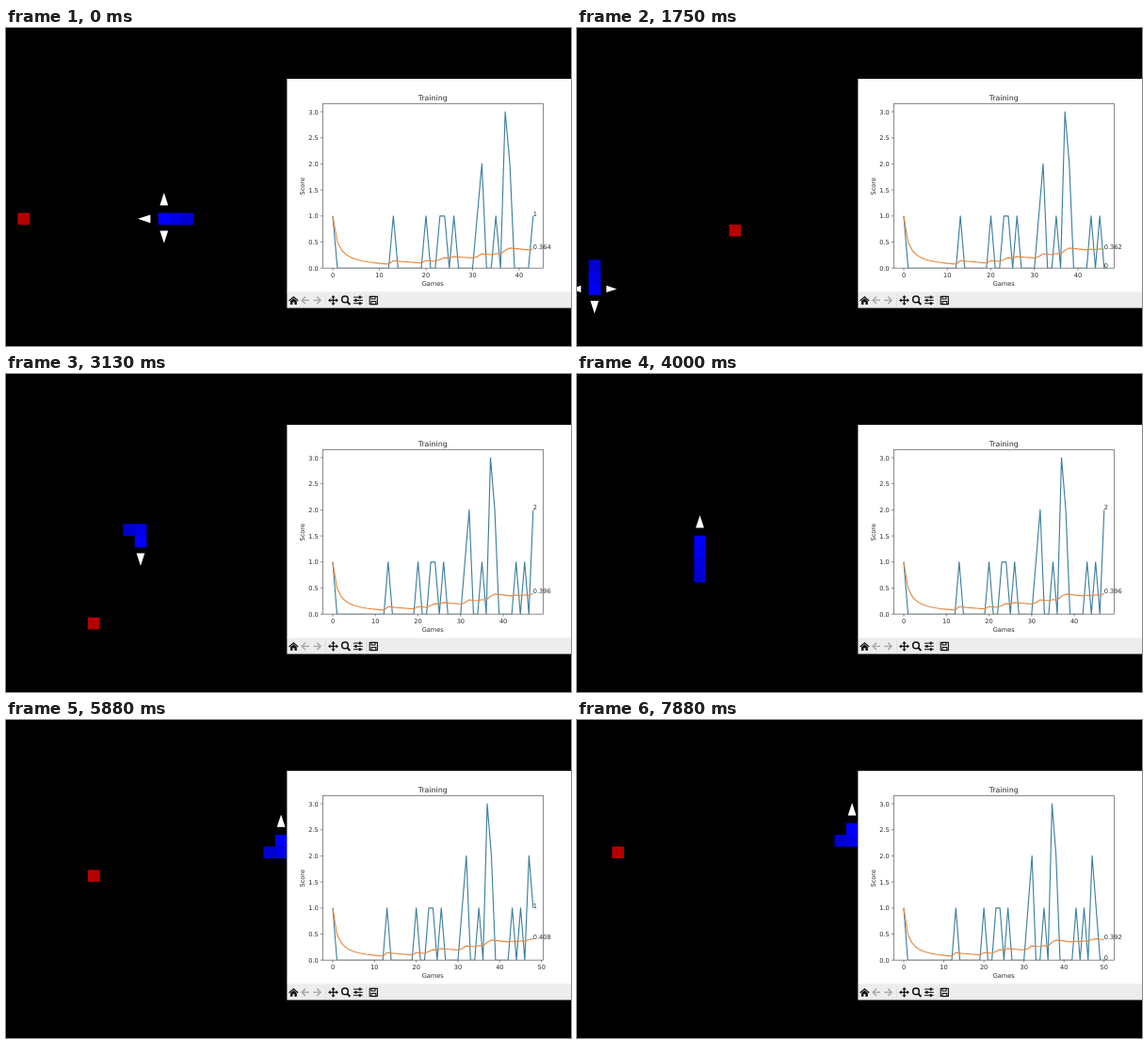
Recreate the animation shown at these times as an HTML page with a canvas. Size 600x338 px, loop 8000 ms.

```html
<!DOCTYPE html>
<html lang="en">
<head>
<meta charset="utf-8">
<title>Training</title>
<style>
html, body { margin: 0; width: 100%; height: 100%; overflow: hidden; background: #000; }
canvas { display: block; }
</style>
</head>
<body>
<canvas id="stage" width="600" height="338"></canvas>
<script>
const ctx = document.getElementById('stage').getContext('2d');
const STEP = 125, LOOP = 8000, SPEED = 5, CELL = 12.43, TOP = -2.3;
const FONT = '"DejaVu Sans", Verdana, sans-serif';

// Start step and the stops of each game; * marks food, which may lie beyond the game's end.
const games = [
  play(-3, '20,16 13,16 6,8 1,16*'),
  play(3, '14,9* 20,20*'),
  play(6, '20,7 9,19*'),
  play(9, '1,22 13,17* 6,7* 0,7 27,9*'),
  play(22, '7,13 11,14 11,17 18,18 7,21* 10,6 28,9*'),
  play(36, '11,10 11,12 12,12 12,14 6,22 16,11 23,10 28,9 7,13*'),
  play(49, '3,17 0,17 7,13*'),
  play(53, '18,17 19,15 23,14 23,13 25,12 16,18 18,10 23,9 3,11*')
];

// One entry for every point scored in the games before
const scores = Array(43).fill(0);
for (const i of [0, 13, 20, 23, 24, 26, 31, 32, 32, 35, 37, 37, 37, 38, 38]) scores[i]++;
scores.push(1);
games.slice(0, -1).forEach((game, i) => scores.push(mealsBy(game, games[i + 1].start)));
let sum = 0;
const means = scores.map((s, i) => (sum += s) / (i + 1));

// The snake leaves the middle and runs to each stop, sideways first.
function play(start, route) {
  const cells = [[16, 12]], meals = [];
  for (const stop of route.split(' ')) {
    const goal = stop.split(',').map(parseFloat);
    for (const axis of [0, 1]) {
      let cell = cells[cells.length - 1];
      while (cell[axis] !== goal[axis]) {
        cell = [...cell];
        cell[axis] += Math.sign(goal[axis] - cell[axis]);
        cells.push(cell);
      }
    }
    if (stop.endsWith('*')) meals.push(cells.length - 1);
  }
  return { start, cells, meals };
}

function mealsBy({ start, meals }, step) {
  return meals.filter(i => i <= (step - start) * SPEED).length;
}

function box([x, y], color) {
  ctx.fillStyle = color;
  ctx.fillRect(x * CELL, TOP + y * CELL, CELL + .2, CELL + .2);
}

function line(points, color, width) {
  ctx.strokeStyle = color;
  ctx.lineWidth = width;
  ctx.beginPath();
  points.forEach(p => ctx.lineTo(...p));
  ctx.stroke();
}

function shape(points, color) {
  ctx.fillStyle = color;
  ctx.beginPath();
  points.forEach(p => ctx.lineTo(...p));
  ctx.fill();
}

function text(str, x, y, align = 'left', size = 6.6) {
  ctx.font = `${size}px ${FONT}`;
  ctx.textAlign = align;
  ctx.fillStyle = '#2a2a2a';
  ctx.fillText(str, x, y);
}

function drawArrow([x, y], dx, dy, size) {
  if (size < .05) return;
  const cx = (x + .5) * CELL, cy = TOP + (y + .5) * CELL;
  const base = dx + dy < 0 ? 14.4 : 12.6, tip = base + 13.4 * size, half = 4.4 * size;
  const at = (along, side) => [cx + dx * along + dy * side, cy + dy * along + dx * side];
  shape([at(base, -half), at(tip, 0), at(base, half)], '#fff');
}

function drawGame(step) {
  const game = games.filter(g => g.start <= step).pop();
  const { cells, meals } = game;
  const i = Math.min((step - game.start) * SPEED, cells.length - 1);
  const eaten = mealsBy(game, step), length = 3 + eaten;

  box(cells[meals[eaten]], '#b60000');
  for (let k = length - 1; k >= 0; k--) {
    if (cells[i - k]) box(cells[i - k], `rgb(0,0,${250 - 42 * k / (length - 1)})`);
  }

  // The sides compete with the way ahead in a slow beat.
  const from = Math.max(i - 1, 0), [ax, ay] = cells[from], [bx, by] = cells[from + 1];
  const dx = bx - ax, dy = by - ay, side = Math.cos(1.838 * step);
  drawArrow(cells[i], dx, dy, 1);
  drawArrow(cells[i], dy, dx, side);
  drawArrow(cells[i], -dy, -dx, side);
}

function drawChart(count) {
  const L = 336.4, R = 570.4, T = 80.6, B = 255.2;
  const px = i => 347 + i * 212.8 / (count - 1), py = v => B - v * 55.4;
  ctx.fillStyle = '#fff';
  ctx.fillRect(298.4, 54, 302, 227);

  ctx.save();
  ctx.beginPath();
  ctx.rect(L, T, R - L, B - T);
  ctx.clip();
  ctx.lineJoin = 'round';
  const plot = (data, color) => line(data.slice(0, count).map((v, i) => [px(i), py(v)]), color, 1.15);
  plot(scores, '#3d7f9f');
  plot(means, '#e58a42');
  ctx.restore();

  ctx.strokeStyle = '#666';
  ctx.lineWidth = .75;
  ctx.strokeRect(L, T, R - L, B - T);
  for (let i = 0; i <= (count - 1) * 1.05; i += 10) {
    line([[px(i), B], [px(i), B + 2.4]], '#555', .7);
    text(i, px(i), 264.6, 'center');
  }
  for (let v = 0; v <= 3; v += .5) {
    line([[L - 2.4, py(v)], [L, py(v)]], '#555', .7);
    text(v.toFixed(1), 331.7, py(v) + 2.5, 'right');
  }
  text('Training', 453.2, 76.6, 'center', 7.9);
  text('Games', 453.2, 274, 'center');
  ctx.save();
  ctx.translate(317.3, 168.3);
  ctx.rotate(-Math.PI / 2);
  text('Score', 0, 0, 'center');
  ctx.restore();

  const last = count - 1;
  text(scores[last], px(last), py(scores[last]));
  text(means[last].toFixed(3), px(last), py(means[last]));
}

function drawToolbar() {
  const ink = '#111', Y = 289.4;
  ctx.fillStyle = '#ededed';
  ctx.fillRect(298.4, 280.4, 302, 17.2);
  for (const x of [339.5, 382.8]) line([[x, 283], [x, 296]], '#dadada', .7);

  // home
  line([[300.6, 290], [305.4, 285.7], [310.2, 290]], ink, 1.2);
  shape([[302, 294], [302, 290.3], [305.4, 287.2], [308.8, 290.3], [308.8, 294]], ink);
  ctx.fillStyle = '#ededed';
  ctx.fillRect(304.4, 291.3, 2, 2.7);

  // back and forward
  for (const [x, d] of [[318, -1], [330.3, 1]]) {
    line([[x - 4 * d, Y], [x + 3.5 * d, Y]], '#aaa', 1.5);
    line([[x, Y - 3.8], [x + 3.8 * d, Y], [x, Y + 3.8]], '#aaa', 1.5);
  }

  // pan
  for (const [x, y] of [[0, -1], [1, 0], [0, 1], [-1, 0]]) {
    const at = (a, s) => [347.5 + x * a + y * s, Y + y * a + x * s];
    line([at(0, 0), at(4, 0)], ink, 1.3);
    shape([at(3, -2.2), at(5.4, 0), at(3, 2.2)], ink);
  }

  // zoom
  ctx.strokeStyle = ink;
  ctx.lineWidth = 1.5;
  ctx.beginPath();
  ctx.arc(360, 288.4, 3.3, 0, 7);
  ctx.stroke();
  line([[362.3, 290.8], [365.4, 294]], ink, 1.9);

  // sliders
  for (const row of [-1, 0, 1]) {
    const y = Y + row * 3.3, x = row ? 375.8 : 371.5;
    line([[369, y], [378.8, y]], ink, 1);
    line([[x, y - 1.5], [x, y + 1.5]], ink, 2);
  }

  // save
  ctx.lineWidth = 1.1;
  ctx.strokeRect(386.2, 285.4, 8.2, 8.2);
  ctx.strokeRect(388, 285.4, 4, 2.6);
  ctx.strokeRect(388, 290.6, 4.8, 3);
}

function draw(now) {
  const step = Math.floor(now % LOOP / STEP);
  ctx.fillStyle = '#000';
  ctx.fillRect(0, 0, 600, 338);
  drawGame(step);
  drawChart(43 + games.filter(g => g.start <= step).length);
  drawToolbar();
}

let start;
function tick(now) {
  start ??= now;
  draw(now - start);
  requestAnimationFrame(tick);
}
draw(0);
requestAnimationFrame(tick);
</script>
</body>
</html>
```
